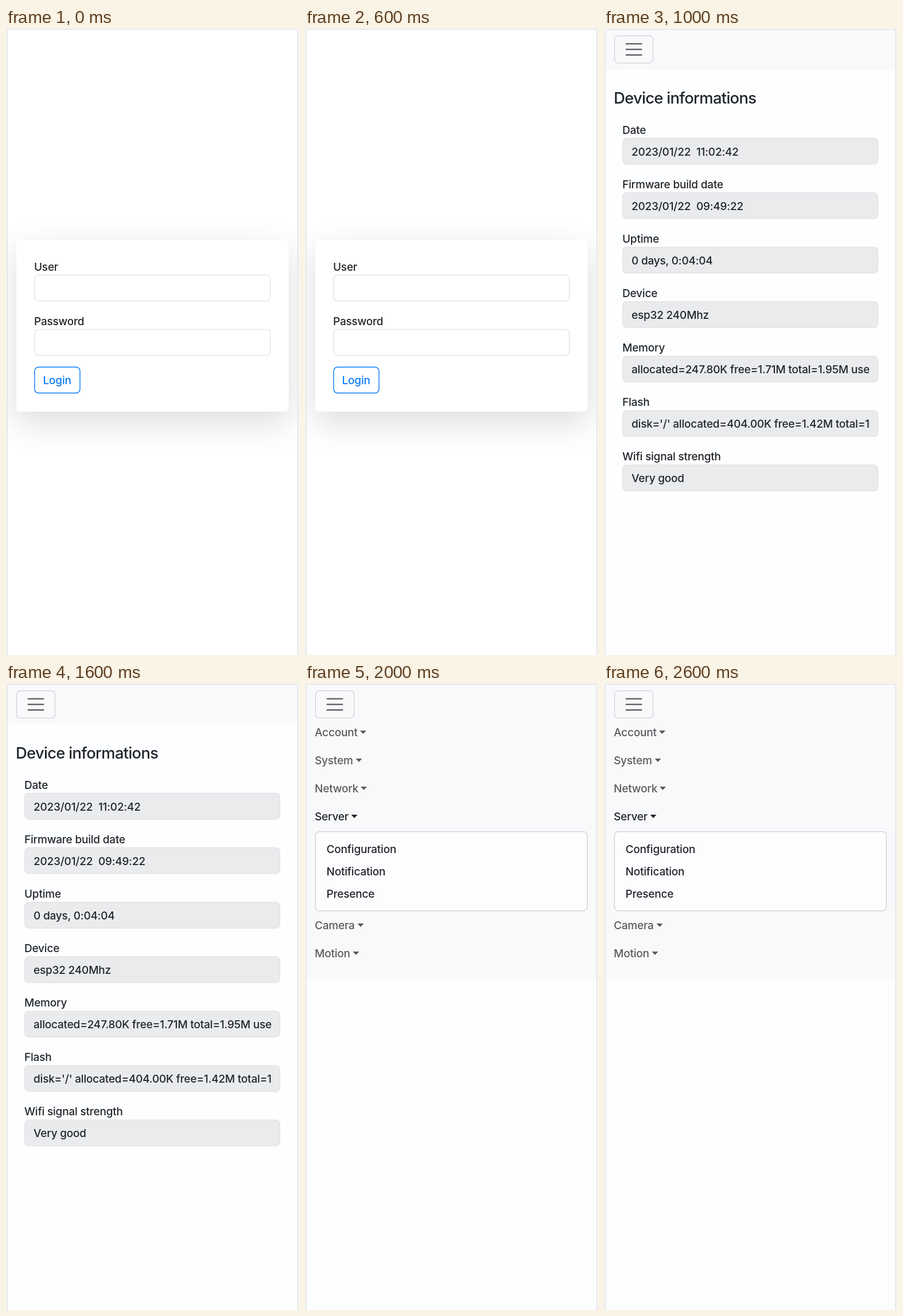
Write an HTML page that moves like this. It is 511 px wide and 1095 px high and loops after 3 s.

```html
<!DOCTYPE html>
<html lang="en">
<head>
<meta charset="utf-8">
<title>Device pages</title>
<style>
  html, body { margin: 0; width: 100%; height: 100%; overflow: hidden; background: #f4f4f5; }
  body { position: relative; font: 450 19px/24px Inter, Roboto, sans-serif; letter-spacing: -0.2px; color: #212529; }
  div { position: absolute; box-sizing: border-box; }
  svg { position: absolute; left: 0; top: 0; }
  #phone { left: 2px; top: 2px; width: 507px; height: 1100px; border: 1px solid #dcdde0; overflow: hidden; }
  .page { left: -3px; top: -3px; width: 511px; height: 1095px; visibility: hidden; }
  .page.on { visibility: visible; }
  .text { white-space: pre; }
  .title { font-size: 27.4px; font-weight: 550; letter-spacing: -0.7px; }
  .bar { background: #f8f9fb; }
  .card { background: #fff; border-radius: 6px; box-shadow: 0 19.5px 58.6px rgba(0, 0, 0, .14); }
  .clip { overflow: hidden; }
  .caret { clip-path: polygon(0 0, 100% 0, 50% 100%); }
  .blue { color: #0a7bfa; }
  .muted { color: #595b5d; }
  .muted.caret { background: #595b5d; }
  .dark.caret { background: #212529; }
  rect { fill: none; stroke-width: 1.22px; }
  .input { fill: #fff; stroke: #dfe0e4; }
  .fixed { fill: #eaebed; stroke: #e0e1e4; }
  .button { stroke: #0a7bfa; stroke-width: 1.4px; }
  .toggle { stroke: #d0d1d4; }
  .menu { fill: #fdfdff; stroke: #cbcdd0; }
  .lines { fill: none; stroke: #56585b; stroke-width: 2.3px; stroke-linecap: round; }
</style>
</head>
<body>
<div id="phone"></div>
<script>
const phone = document.getElementById('phone');

function add(parent, cls, x, y, w, h) {
  const el = document.createElement('div');
  el.className = cls;
  el.style.left = x + 'px';
  el.style.top = y + 'px';
  if (w) el.style.width = w + 'px';
  if (h) el.style.height = h + 'px';
  parent.append(el);
  return el;
}

function shape(parent, tag, attrs) {
  const el = document.createElementNS('http://www.w3.org/2000/svg', tag);
  for (const name in attrs) el.setAttribute(name, attrs[name]);
  parent.append(el);
  return el;
}

// left, top, right and bottom follow the middle of the outline
function box(parent, cls, left, top, right, bottom) {
  const svg = shape(parent, 'svg', { width: 511, height: 1095 });
  shape(svg, 'rect', { class: cls, x: left, y: top, width: right - left, height: bottom - top, rx: 6.7 });
}

// mid is the vertical centre of the capitals
function text(parent, str, x, mid, cls = '') {
  add(parent, 'text ' + cls, x, mid - 11).textContent = str;
}

function page(color) {
  const el = add(phone, 'page', -3, -3);
  el.style.background = color;
  return el;
}

function navbar(parent, bottom) {
  add(parent, 'bar', 3, 3, 505, bottom - 3);
  box(parent, 'toggle', 18.4, 13.6, 85.6, 61.4);
  const svg = shape(parent, 'svg', { width: 100, height: 70 });
  shape(svg, 'path', { class: 'lines', d: 'M38.6 27.6h26.8m-26.8 9.8h26.8m-26.8 9.8h26.8' });
}

function loginPage() {
  const p = page('#fff');
  add(p, 'card', 18, 370, 475, 300);
  ['User', 'Password'].forEach((label, i) => {
    const y = 95.1 * i;
    text(p, label, 49, 416.5 + y);
    box(p, 'input', 49.9, 431.4 + y, 461, 476.7 + y);
  });
  box(p, 'button', 49.9, 592.2, 129, 637.5);
  text(p, 'Login', 64.5, 615, 'blue');
  return p;
}

function infoPage() {
  const p = page('#fdfeff');
  navbar(p, 72);
  text(p, 'Device informations', 17, 121, 'title');
  const rows = [
    ['Date', '2023/01/22  11:02:42'],
    ['Firmware build date', '2023/01/22  09:49:22'],
    ['Uptime', '0 days, 0:04:04'],
    ['Device', 'esp32 240Mhz'],
    ['Memory', 'allocated=247.80K free=1.71M total=1.95M used=12.70%'],
    ['Flash', "disk='/' allocated=404.00K free=1.42M total=1.81M used=21.79%"],
    ['Wifi signal strength', 'Very good']
  ];
  rows.forEach(([label, value], i) => {
    const y = 95.1 * i;
    text(p, label, 32, 177.5 + y);
    box(p, 'fixed', 32.8, 192.6 + y, 477.6, 237.9 + y);
    text(add(p, 'clip', 48, 193 + y, 414.5, 44), value, 0, 22.5);
  });
  return p;
}

function menuPage() {
  const p = page('#fcfdfe');
  navbar(p, 516);
  const items = [
    ['Account', 86, 96], ['System', 135, 88.5], ['Network', 184, 97],
    ['Server', 233, 80.5, 'dark'], ['Camera', 423, 91.5], ['Motion', 472, 83.5]
  ];
  for (const [label, mid, x, tone = 'muted'] of items) {
    text(p, label, 17, mid, tone);
    add(p, 'caret ' + tone, x, mid - 3, 11, 6);
  }
  box(p, 'menu', 18.3, 259.7, 492.4, 397.8);
  ['Configuration', 'Notification', 'Presence'].forEach((label, i) =>
    text(p, label, 37.5, 290 + 39.2 * i));
  return p;
}

const pages = [loginPage(), infoPage(), menuPage()];

function draw(now) {
  const current = Math.floor(now / 1000) % pages.length;
  pages.forEach((p, i) => p.classList.toggle('on', i === current));
  requestAnimationFrame(draw);
}
draw(performance.now());
</script>
</body>
</html>
```
